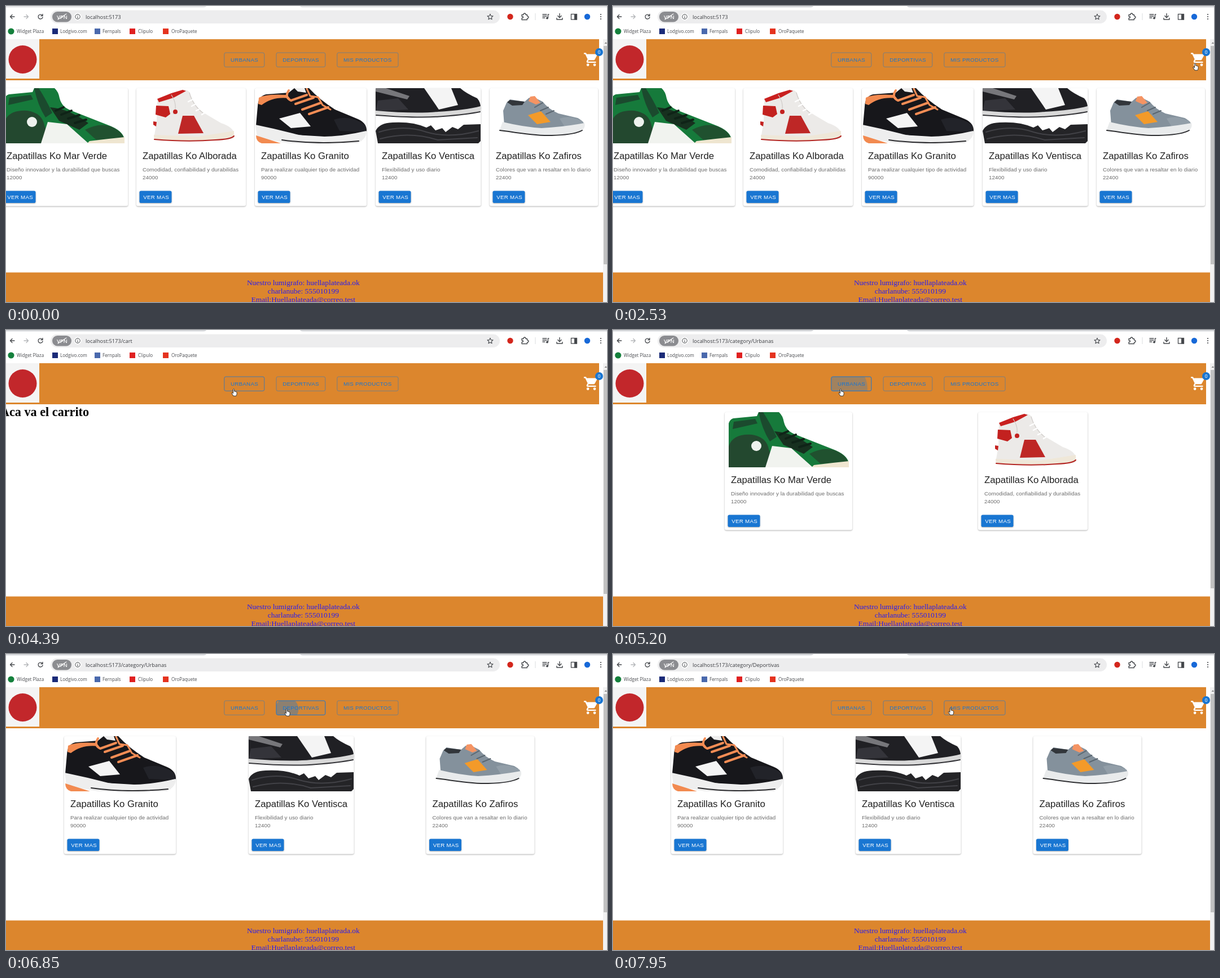
Write an HTML page that moves like this. It is 1065x526 px and loops after 8 s.

```html
<!DOCTYPE html>
<html lang="es">
<head>
<meta charset="utf-8">
<title>Tienda de zapatillas</title>
<style>
html, body { margin: 0; width: 100%; height: 100%; overflow: hidden; background: #fff; }
svg { display: block; width: 1065px; height: 526px; }
text { white-space: pre; }
.ui { font-family: "Open Sans", "Noto Sans", sans-serif; }
.sans { font-family: "Liberation Sans", Arial, sans-serif; }
.serif { font-family: "Liberation Serif", "Times New Roman", serif; }
.caps { font-size: 9.73px; letter-spacing: .028em; }
.card { fill: #fff; filter: drop-shadow(0 1px 1px rgba(0,0,0,.32)); }
.buy { fill: #1976d2; filter: drop-shadow(0 1px 1px rgba(0,0,0,.3)); }
</style>
</head>
<body>
<svg id="stage" viewBox="0 0 1065 526" xmlns="http://www.w3.org/2000/svg"></svg>
<script>
const LOOP = 8000, ORANGE = '#dc862d', BLUE = '#1976d2';
const clamp = v => Math.max(0, Math.min(1, v));
const rect = (x, y, w, h, fill, extra = '') =>
  `<rect x="${x}" y="${y}" width="${w}" height="${h}" fill="${fill}" ${extra}/>`;
const dot = (x, y, r, fill) => `<circle cx="${x}" cy="${y}" r="${r}" fill="${fill}"/>`;
const shape = (d, fill) => `<path d="${d}" fill="${fill}"/>`;
const line = (d, color, w) =>
  `<path d="${d}" fill="none" stroke="${color}" stroke-width="${w}" stroke-linecap="round" stroke-linejoin="round"/>`;
const text = (s, x, y, size, fill, cls = 'sans', extra = '') =>
  `<text x="${x}" y="${y}" font-size="${size}" fill="${fill}" class="${cls}" ${extra}>${s}</text>`;

// Shoe pictures, in coordinates of their card
const shoes = {
  green:
    shape('M7 166Q9 159 15 157L57 153L60 146H96Q103 152 105 164Q109 180 126 186L192 212Q216 221 220 236V244H7Z', '#167a3b') +
    shape('M7 207Q14 184 48 186Q74 190 78 212L90 244H7Z', '#23482f') +
    shape('M16 163L54 158L58 166L14 176Z', '#1b4a2e') +
    shape('M60 146H68Q82 168 92 190L80 198Q66 176 60 146Z', '#1b4a2e') +
    shape('M88 180Q120 182 156 208L140 220L104 204Z', '#17301f') +
    line('M98 186L112 180M108 193L126 186M120 200L140 194M132 208L152 202', '#0f2317', 4) +
    shape('M150 220Q176 206 198 215Q216 224 218 234L170 238Z', '#20512f') +
    shape('M158 240Q190 236 220 233V244H154Z', '#efe6d0') +
    shape('M84 206L118 210L156 244H72Z', '#f1f3ef') +
    dot(56, 206, 9, '#eef2ee'),
  red:
    shape('M37 166L62 155L82 149Q94 148 95 157Q100 177 118 189L150 208Q171 215 173 226L171 236L31 235L36 206Z', '#eceae8') +
    shape('M37 165L62 155L82 149L88 151L66 163L40 171Z', '#c9201f') +
    shape('M35 177L57 178L60 192L52 198L34 193Z', '#c3211f') +
    line('M62 158Q74 176 66 192M94 154Q100 176 118 190', '#cfcbc8', 1.2) +
    line('M92 170L104 164M98 178L109 172M106 186L118 180M116 193L126 187', '#fff', 2.5) +
    shape('M30 205L36 206L35 214L30 211Z', '#c3211f') +
    shape('M82 195L102 195L119 226L74 227Z', '#be2726') +
    dot(69, 188, 4, '#c3211f') +
    shape('M31 229L110 232L173 222V234Q150 239 110 240L32 238Z', '#efe7d8') +
    line('M32 237Q90 242 140 238Q168 237 173 231', '#b32522', 2),
  black:
    shape('M5 178Q6 160 20 157L60 154L70 146H96Q114 166 142 184L178 199Q198 206 198 221L192 236L20 226L2 212Z', '#17171b') +
    shape('M7 163Q20 156 57 158L62 164Q32 160 12 176L6 174Z', '#f28a50') +
    shape('M70 146H88L91 154L76 152Z', '#eeeeee') +
    line('M60 150Q52 162 64 168L92 158M72 174L104 163M84 184L117 172M96 192L130 180', '#f58d55', 4) +
    line('M92 147L98 160L112 162L120 176L134 184', '#f58d55', 3) +
    shape('M140 202Q168 192 196 212L196 224L150 222Z', '#222329') +
    shape('M1 211Q40 219 78 229Q130 238 197 222Q200 234 182 244H60L4 234Z', '#eeeeee') +
    shape('M2 230L46 244H12Q2 241 2 230Z', '#f28a50') +
    shape('M43 200L80 190L99 214L64 217Z', '#f4f4f4') +
    line('M48 238Q110 247 184 240', '#2b2b2e', 2),
  sole:
    shape('M0 146H150Q160 155 180 164Q187 172 186 184L100 192L0 191Z', '#202024') +
    shape('M4 168L40 164L58 184L0 187Z', '#34343a') +
    shape('M0 146H18L60 160L56 166L0 152Z', '#77777b') +
    shape('M86 146H134L146 176L112 184Z', '#f4f4f4') +
    shape('M0 186Q70 192 110 188Q160 185 186 178V188Q130 197 80 197L0 193Z', '#d9d9d9') +
    line('M1 194Q80 200 120 196Q160 193 185 188', '#333337', 2) +
    shape('M0 222Q6 208 30 207Q66 205 90 216L98 212L106 221L118 217L124 224L136 215L146 219L156 211L186 210V240L182 244H4Z', '#242427') +
    line('M6 224Q50 210 90 224Q130 236 182 222M8 236Q60 222 110 238L180 234', '#424247', 2),
  gray:
    shape('M24 186L30 172L36 166L62 170L70 163L84 165L94 170Q104 183 122 191L156 199Q169 206 168 214L120 222L26 213Z', '#84919c') +
    shape('M31 171L36 167L62 170L58 176L40 177Z', '#32363b') +
    shape('M69 169L72 161L80 160L90 172L82 175Z', '#f59463') +
    line('M80 180L94 172M90 186L104 180M100 192L114 186', '#5b6771', 2) +
    shape('M124 200Q144 193 166 206L166 214L134 216Z', '#929ea8') +
    shape('M68 194L91 187L108 206L84 210Z', '#f39a29') +
    shape('M23 206Q60 215 92 217Q130 215 168 208Q171 218 160 223Q130 231 90 229L18 220Z', '#e9ebec') +
    line('M18 221L34 223Q84 231 110 230Q150 229 164 221', '#2c2d30', 2)
};

// name, description, price, picture, card width
const goods = [
  ['Mar Verde', 'Diseño innovador y la durabilidad que buscas', 12000, 'green', 226],
  ['Alborada', 'Comodidad, confiabilidad y durabilidas', 24000, 'red', 194],
  ['Granito', 'Para realizar cualquier tipo de actividad', 90000, 'black', 198],
  ['Ventisca', 'Flexibilidad y uso diario', 12400, 'sole', 186.5],
  ['Zafiros', 'Colores que van a resaltar en lo diario', 22400, 'gray', 192]
];

function card(i, x) {
  const [name, about, price, pic, w] = goods[i];
  const small = 'letter-spacing=".1"';
  return `<g transform="translate(${x} 0)">` +
    rect(0, 146, w, 209.5, '#fff', 'rx="3" class="card"') +
    `<g clip-path="url(#photo)">${shoes[pic]}</g>` +
    text('Zapatillas Ko ' + name, 11, 272, 16.68, '#212121') +
    text(about, 11, 294, 9.73, '#6b6b6b', 'sans', small) +
    text(price, 11, 308, 9.73, '#6b6b6b', 'sans', small) +
    rect(5.5, 328.5, 57, 21.5, BLUE, 'rx="2.8" class="buy"') +
    text('VER MAS', 12.3, 342.5, 9.73, '#fff', 'sans caps') + '</g>';
}

const pages = {
  home: [-10, 231, 441, 655, 857].map((x, i) => card(i, x)).join(''),
  cart: text('Aca va el carrito', -10, 153, 22.2, '#000', 'serif', 'font-weight="700"'),
  urban: card(0, 198) + card(1, 647),
  sport: card(2, 103) + card(3, 430) + card(4, 744.5)
};

const INK = '#45484c';
const bookmarks = [
  [9, 'Widget Plaza', 19, '#14803c', 1], [87, 'Lodgivo.com', 96, '#1b2b78'],
  [162, 'Fernpals', 171, '#4a69ad'], [224, 'Clipulo', 234, '#e02020'],
  [283, 'OroPaquete', 293, '#e5331f']
];
const browser =
  rect(0, 0, 1065, 59, '#fff') +
  `<path id="strip" d="M0 0H355Q354 2 350 2.5H0ZM521 0H1065V2.5H526Q522 2 521 0Z"/>` +
  rect(79, 7.5, 796, 23.5, '#ededee', 'rx="11.7"') +
  line('M15 19H8M11 15.5L7.5 19L11 22.5', INK, 1.3) +
  line('M32 19H39M36 15.5L39.5 19L36 22.5', '#b4b6b9', 1.3) +
  line('M64.3 16.6A4 4 0 1 0 65 20M65 14.5V17.5H62', INK, 1.3) +
  rect(82, 10, 34, 18.5, '#8b8c90', 'rx="9.2"') +
  text('VPN', 90, 22.8, 9.4, '#fff', 'ui', 'font-weight="600"') +
  line('M92 24L107 14', '#fff', 1.1) +
  dot(127, 19, 6.5, '#fff') +
  `<circle cx="127" cy="19" r="4.2" fill="none" stroke="${INK}"/>` +
  line('M127 18.8V21.2M127 16.7V16.8', INK, 1.1) +
  text('', 141, 23, 9.3, '#3a3c40', 'ui', 'id="url"') +
  line('M858 14.3L859.4 17.6L863 17.9L860.3 20.3L861.1 23.8L858 22L854.9 23.8L855.7 20.3L853 17.9L856.6 17.6Z', INK, 1.1) +
  dot(893.5, 19, 5.2, '#d3261c') +
  line('M914 15.5H917Q917 13 919 13Q921 13 921 15.5H923.5V18Q926 18 926 20Q926 22 923.5 22V24.5H914V21.5Q916.5 21.5 916.5 20Q916.5 18.5 914 18.5Z', INK, 1.3) +
  rect(937.5, 13, 1, 12, '#dcdde0') +
  line('M951 15H958M951 18H958M951 21H955M960.5 21V15H962', INK, 1.3) + dot(959, 21.5, 1.9, INK) +
  line('M981 13.5V20.5M977.8 17.5L981 20.7L984.2 17.5M976 21.5V24H986V21.5', INK, 1.4) +
  rect(1001.5, 14.5, 10, 9.5, 'none', `stroke="${INK}" stroke-width="1.3"`) + rect(1007, 14, 5, 10.5, INK) +
  dot(1030, 19, 5.2, '#1769d8') +
  [15, 19, 23].map(y => dot(1054, y, 1.1, INK)).join('') +
  bookmarks.map(([cx, name, x, color, round]) =>
    (round ? dot(cx, 45, 5.6, color) : rect(cx - 5, 40, 10, 10, color)) +
    text(name, x, 48.2, 8.1, '#4a4c50', 'ui')).join('');

const buttons = [
  { label: 'URBANAS', x: 386.8, w: 71, on: 4260, off: 6080, click: 4930, cx: 403.5, cy: 104 },
  { label: 'DEPORTIVAS', x: 479, w: 86.8, on: 6270, off: 7740, click: 6780, cx: 498, cy: 98 },
  { label: 'MIS PRODUCTOS', x: 586.8, w: 108.2, on: 7880, off: LOOP, click: -1 }
];
const nav = buttons.map((b, i) =>
  `<clipPath id="hole${i}">${rect(b.x, 83, b.w, 25.3, '#000', 'rx="2.8"')}</clipPath>` +
  rect(b.x, 83, b.w, 25.3, BLUE, `rx="2.8" stroke="${BLUE}" id="nav${i}"`) +
  text(b.label, b.x + 11.2, 99, 9.73, BLUE, 'sans caps') +
  `<circle id="wave${i}" cx="${b.cx || 0}" cy="${b.cy || 0}" r="0" fill="${BLUE}" clip-path="url(#hole${i})"/>`
).join('');

const header =
  rect(0, 59, 1051, 73, ORANGE) +
  rect(0, 59, 59, 70, '#f4f4f4') + dot(29.5, 95, 25, '#c2272b') + nav +
  `<path transform="translate(1022.8 80.8) scale(1.19)" fill="#fff" d="M7 18a2 2 0 1 0 0 4a2 2 0 1 0 0-4zM1 2v2h2l3.6 7.59-1.35 2.45c-.16.28-.25.61-.25.96 0 1.1.9 2 2 2h12v-2H7.42a.25.25 0 0 1-.25-.25l.03-.12.9-1.63h7.45c.75 0 1.41-.41 1.75-1.03l3.58-6.49c.08-.14.12-.31.12-.48 0-.55-.45-1-1-1H5.21l-.94-2zM17 18a2 2 0 1 0 0 4a2 2 0 1 0 0-4z"/>` +
  dot(1051, 82, 7, BLUE) + text('0', 1051, 85, 8.4, '#fff', 'sans', 'text-anchor="middle"');

const footer = rect(0, 473.5, 1058, 53, ORANGE) +
  ['Nuestro lumigrafo: huellaplateada.ok', 'charlanube: 555010199', 'Email:Huellaplateada@correo.test']
    .map((s, i) => text(s, 526.8, 495.5 + 15 * i, 13.4, '#2a1df0', 'serif', 'text-anchor="middle"')).join('');

const scrollbar = rect(1058, 59, 7, 467, '#f1f1f1') +
  shape('M1060.5 67L1063 64L1065 67Z', '#8a8a8a') + rect(1059, 71, 6, 388, '#c1c1c1', 'id="thumb"');

const pointer = `<g id="cursor">
  <path id="arrow" d="M0 0V9.6L2.2 7.7L3.7 11L5.3 10.3L3.9 7.1L6.9 6.9Z" fill="#fff" stroke="#222" stroke-width=".9" stroke-linejoin="round"/>
  <path id="hand" d="M-1 .9Q0 -.5 1 .9V4.6Q2.4 4 2.8 5Q4 4.6 4.4 5.7Q5.7 5.6 5.6 7V9.2Q5.2 11 4.4 12.7H-.6Q-1.8 10.4 -3.6 8.2Q-4 6.6 -2.6 6.9L-1 8.2Z" fill="#fff" stroke="#222" stroke-width=".9" stroke-linejoin="round"/></g>`;

const stage = document.getElementById('stage');
stage.innerHTML =
  `<defs><clipPath id="photo">${rect(0, 146, 226, 98, '#000')}</clipPath></defs>` +
  rect(0, 0, 1065, 526, '#fff') +
  Object.entries(pages).map(([id, body]) => `<g id="${id}">${body}</g>`).join('') +
  footer + header + browser + scrollbar + pointer;
const $ = id => document.getElementById(id);
const set = (id, attrs) => { for (const k in attrs) $(id).setAttribute(k, attrs[k]); };

// first step, last step, number of steps, end point
const moves = [
  [310, 310, 1, 1025, 475], [380, 450, 2, 1000, 394], [780, 980, 4, 968.5, 221],
  [1250, 1800, 9, 1023.5, 111.5], [1870, 2000, 3, 1030, 105], [2070, 2200, 3, 1031.5, 101.5],
  [3130, 3330, 4, 525.5, 169.5], [3730, 3860, 3, 396.5, 123.5], [4190, 4390, 4, 403.5, 104.5],
  [5910, 6120, 4, 469.5, 102.5], [6190, 6330, 3, 497.5, 97.5], [7680, 7950, 5, 598, 95.5]
];
function cursorAt(t) {
  let x = 1025, y = 475;
  for (const [a, b, n, ex, ey] of moves) {
    if (t < a) break;
    const gap = n > 1 ? (b - a) / (n - 1) : 1;
    const p = Math.min(n, Math.floor((t - a) / gap + 1.001)) / n;
    x += (ex - x) * p;
    y += (ey - y) * p;
  }
  return [x, y];
}
const overLink = (x, y) => y > 83 && y < 109 &&
  (buttons.some(b => x > b.x && x < b.x + b.w) || (x > 1023 && x < 1052));

function draw(t) {
  const page = t < 2730 ? 'home' : t < 5000 ? 'cart' : t < 6850 ? 'urban' : 'sport';
  for (const id in pages) $(id).style.display = id === page ? '' : 'none';
  const path = t < 2800 ? '' : t < 5070 ? '/cart' : t < 6920 ? '/category/Urbanas' : '/category/Deportivas';
  $('url').textContent = 'localhost:5173' + path;
  set('strip', { fill: t < 2530 ? '#e3e4e6' : '#d6d8db' });
  set('thumb', { height: page === 'cart' ? 398 : 388 });

  buttons.forEach((b, i) => {
    const hover = clamp((t - b.on) / 250) - clamp((t - b.off) / 250);
    set('nav' + i, { 'fill-opacity': .04 * hover, 'stroke-opacity': .5 + .5 * hover });
    const age = t - b.click, live = b.click > 0 && age >= 0 && age < 660;
    set('wave' + i, {
      r: live ? b.w * .83 * (1 - (1 - clamp(age / 550)) ** 2.4) : 0,
      opacity: .38 * (1 - clamp((age - 110) / 550))
    });
  });

  const [x, y] = cursorAt(t), link = overLink(x, y);
  set('cursor', { transform: `translate(${x.toFixed(1)} ${y.toFixed(1)})` });
  $('cursor').style.display = t < 310 ? 'none' : '';
  $('arrow').style.display = link ? 'none' : '';
  $('hand').style.display = link ? '' : 'none';
}

const start = performance.now();
function tick() {
  draw((performance.now() - start) % LOOP);
  requestAnimationFrame(tick);
}
tick();
</script>
</body>
</html>
```
